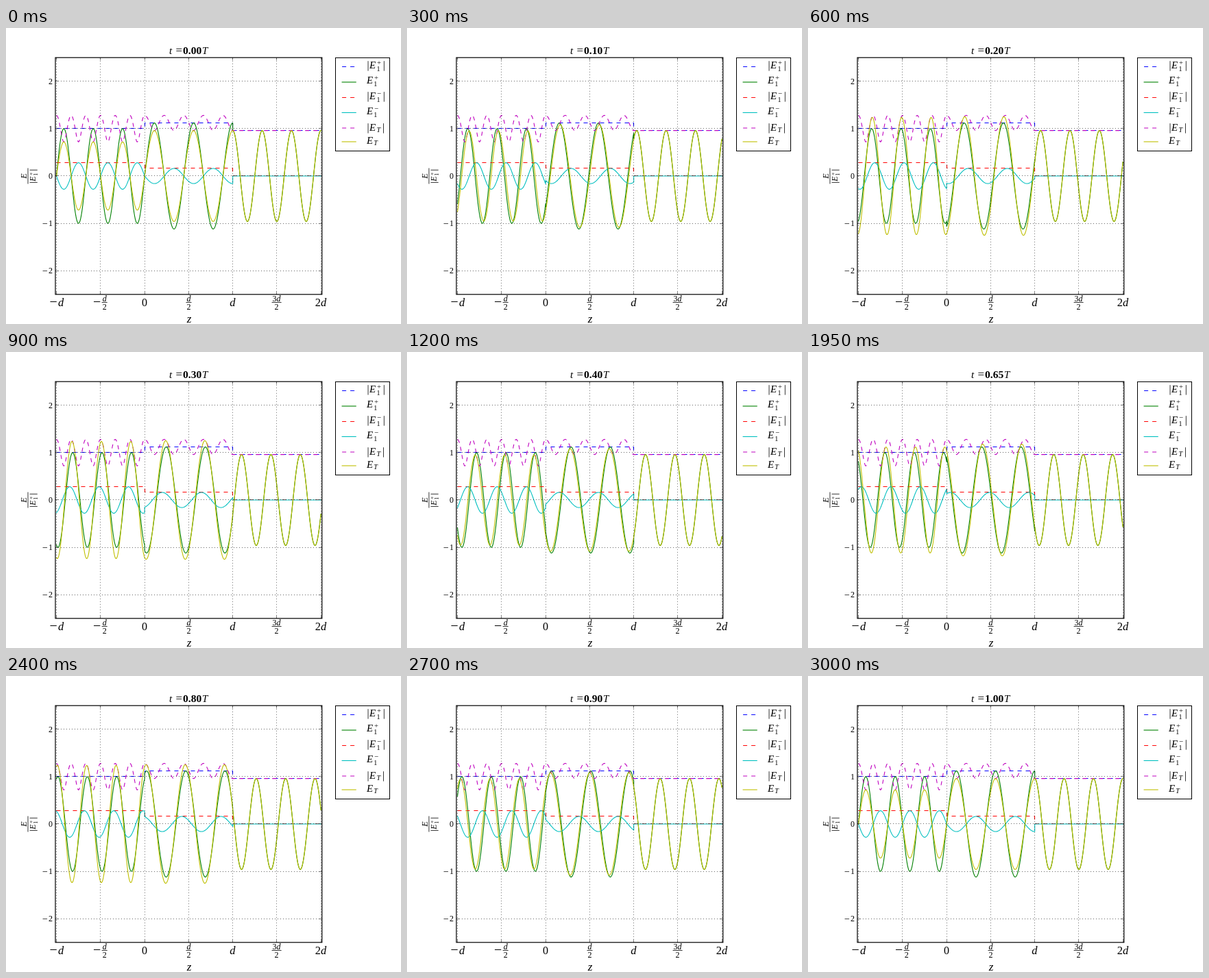
An HTML page that plays this animation: 576x432 px, repeating every 3150 ms.

```html
<!DOCTYPE html>
<html lang="en">
<head>
<meta charset="utf-8">
<title>Waves in a layered medium</title>
<style>
  html, body { margin: 0; width: 100%; height: 100%; overflow: hidden; background: #fff; }
  svg { display: block; width: 576px; height: 432px; }
  text { font-family: "Liberation Serif", "Noto Serif", serif; fill: #000; }
  .it { font-style: italic; }
  .mid { text-anchor: middle; }
  .curve { fill: none; stroke-width: 1.1; stroke-linejoin: round; stroke-linecap: square; }
  .dashed { stroke-dasharray: 6 6; stroke-linecap: butt; }
  .grid { stroke: #000; stroke-width: .6; stroke-dasharray: 1 3; }
  .tick { stroke: #000; stroke-width: .5; }
  .bar { stroke: #000; stroke-width: .8; }
</style>
</head>
<body>
<svg id="stage" viewBox="0 0 576 432"></svg>
<script>
const STEP_MS = 150, STEPS = 21;
const BOX = { left: 72, right: 460.8, top: 43.2, bottom: 388.8 };
const UNIT = (BOX.right - BOX.left) / 3.025;
const X = z => 266.4 + (z - 0.5) * UNIT;
const Y = v => 216 - v * 69.12;
const snapX = x => Math.floor(x) + 0.5;
const snapY = y => Math.ceil(y) - 0.5;

// Each layer: start, phase reference, wavenumber, forward and backward amplitude, phase
const LAYERS = [
  { from: -1, ref: 0, k: 6 * Math.PI, fwd: 1, back: 0.28, phase: Math.PI / 2 },
  { from: 0, ref: 1, k: 4.5 * Math.PI, fwd: 1.12, back: -0.16, phase: 0 },
  { from: 1, ref: 1, k: 6 * Math.PI, fwd: 0.96, back: 0, phase: 0 }
];

const forward = (l, z, wt) => l.fwd * Math.cos(wt - l.k * (z - l.ref) + l.phase);
const backward = (l, z, wt) => l.back * Math.cos(wt + l.k * (z - l.ref) + l.phase);
const envelope = (l, z) =>
  Math.sqrt(l.fwd ** 2 + l.back ** 2 + 2 * l.fwd * l.back * Math.cos(2 * l.k * (z - l.ref)));

const CURVES = [
  { color: "#0000ff", level: l => l.fwd, sup: "+", bars: true, row: [56.5, 59] },
  { color: "#008000", wave: forward, sup: "+", row: [79, 81] },
  { color: "#ff0000", level: l => Math.abs(l.back), sup: "−", bars: true, row: [101.5, 104] },
  { color: "#00bfbf", wave: backward, sup: "−", row: [123.5, 126] },
  { color: "#bf00bf", shape: envelope, bars: true, row: [146, 150] },
  { color: "#bfbf00", wave: (l, z, wt) => forward(l, z, wt) + backward(l, z, wt), row: [166, 169] }
];

function wavePath(fn, wt = 0, samples = 160) {
  const points = [];
  for (const layer of LAYERS) {
    for (let i = 0; i <= samples; i++) {
      const z = layer.from + i / samples;
      points.push(X(z).toFixed(2) + " " + Y(fn(layer, z, wt)).toFixed(2));
    }
  }
  return "M" + points.join("L");
}

function levelPath(fn) {
  const runs = LAYERS.map(l => {
    const y = snapY(Y(fn(l)));
    return `${snapX(X(l.from))} ${y}L${snapX(X(l.from + 1))} ${y}`;
  });
  return "M" + runs.join("L");
}

const line = (cls, x1, y1, x2, y2) =>
  `<line class="${cls}" x1="${x1}" y1="${y1}" x2="${x2}" y2="${y2}"/>`;
const text = (x, y, size, str, cls = "") =>
  `<text x="${x}" y="${y}" font-size="${size}" class="${cls}">${str}</text>`;

// Field symbol: E with stacked scripts, optionally between magnitude bars
function symbol(x, y, em, sup, bars) {
  const start = bars ? x + 0.28 * em : x;
  const script = start + 0.72 * em;
  let out = text(start, y, em * 1.04, "E", "it");
  if (sup) {
    out += text(script + 0.05 * em, y - 0.36 * em, em * 0.74, sup);
    out += text(script, y + 0.25 * em, em * 0.7, "1");
  } else {
    out += text(script, y + 0.16 * em, em * 0.7, "T", "it");
  }
  if (bars) {
    for (const bx of [x + 0.14 * em, x + (sup ? 1.76 : 1.7) * em]) {
      out += line("bar", bx, y - 0.75 * em, bx, y + 0.25 * em);
    }
  }
  return out;
}

function fraction(x, top, half) {
  return text(x, 398.5, 12, top, "mid") + line("bar", x - half, 400.5, x + half, 400.5) +
    text(x, 410.5, 12, "2", "mid");
}

function axes() {
  let out = "";
  for (let i = 0; i <= 6; i++) {
    const x = snapX(X(-1 + i / 2));
    out += line("grid", x, BOX.bottom, x, BOX.top);
    out += line("tick", x, BOX.bottom, x, BOX.bottom - 4) + line("tick", x, BOX.top, x, BOX.top + 4);
  }
  for (let v = -2; v <= 2; v++) {
    const y = snapY(Y(v));
    out += line("grid", BOX.left, y, BOX.right, y);
    out += line("tick", BOX.left, y, BOX.left + 4, y) + line("tick", BOX.right, y, BOX.right - 4, y);
    out += text(62, Y(v) + 4, 12, Math.abs(v));
    if (v < 0) out += text(53, Y(v) + 4.5, 14, "−");
  }
  out += `<rect x="72" y="43.2" width="388.8" height="345.6" fill="none" stroke="#000" stroke-width="1.2"/>`;

  const d = '<tspan class="it">d</tspan>';
  out += text(63.5, 406, 20, "−") + text(76, 405.5, 16.5, d);
  out += text(127, 406, 20, "−") + fraction(143.7, d, 4);
  out += text(202, 405.5, 16, "0", "mid");
  out += fraction(266.5, d, 4);
  out += text(330.3, 405.5, 16.5, d, "mid");
  out += fraction(394.6, "3" + d, 7);
  out += text(459, 405.5, 16.5, "2" + d, "mid");
  out += text(267, 429.5, 17, "z", "it mid");

  out += `<g transform="translate(32 216) rotate(-90)">` +
    text(0, -2, 12, "E", "it mid") + line("bar", -11.5, 0, 11.5, 0) +
    symbol(-11, 11, 11.2, "+", true) + "</g>";
  return out;
}

function legend() {
  let out = `<rect x="480.5" y="43.5" width="79" height="136" fill="#fff" stroke="#000"/>`;
  for (const c of CURVES) {
    const [y, base] = c.row;
    out += `<path class="curve ${c.wave ? "" : "dashed"}" stroke="${c.color}" d="M490.1 ${y}H510.2"/>`;
    out += symbol(526, base, 14.4, c.sup, c.bars);
  }
  return out;
}

const title = text(238, 38, 15, "t", "it") + text(247.5, 38, 17, "=") +
  `<text id="clock" x="258" y="38" font-size="15.5" font-weight="bold"></text>` +
  text(286, 38, 15, "T", "it");

const stage = document.getElementById("stage");
stage.innerHTML = CURVES.map(c => {
  const d = c.level ? levelPath(c.level) : wavePath(c.wave || c.shape);
  return `<path class="curve ${c.wave ? "wave" : "dashed"}" stroke="${c.color}" d="${d}"/>`;
}).join("") + axes() + legend() + title;

const clock = document.getElementById("clock");
const wavePaths = [...stage.querySelectorAll(".wave")];
const waves = CURVES.filter(c => c.wave);
let shown = -1;

function draw(step) {
  const t = step / (STEPS - 1);
  clock.textContent = t.toFixed(2);
  waves.forEach((c, i) => wavePaths[i].setAttribute("d", wavePath(c.wave, 2 * Math.PI * t)));
}

function tick() {
  const step = Math.floor(performance.now() / STEP_MS) % STEPS;
  if (step !== shown) draw(shown = step);
  requestAnimationFrame(tick);
}
tick();
</script>
</body>
</html>
```
